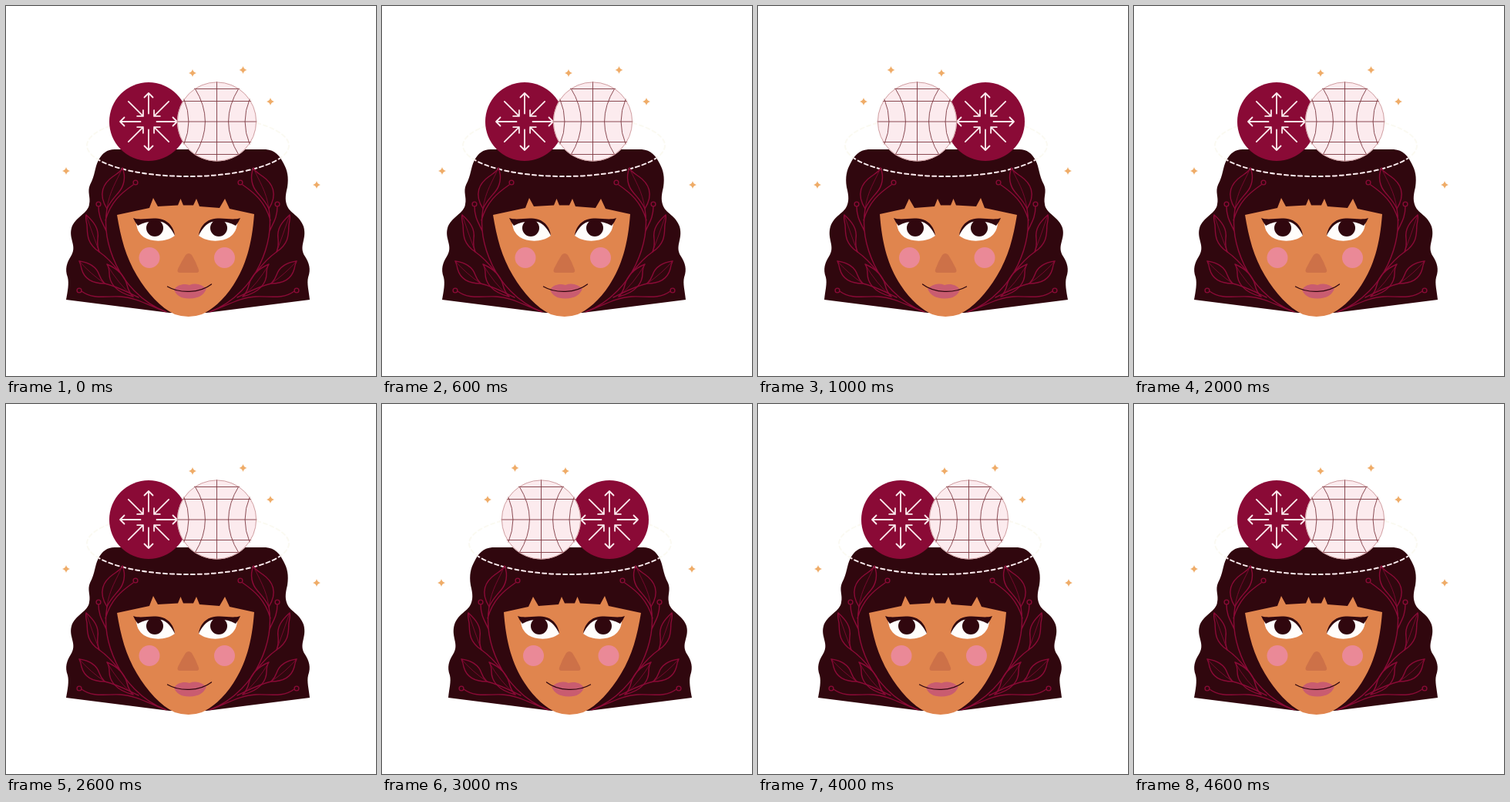
Write an HTML page with a canvas that moves like this. It is 480 px wide and 480 px high and loops after 5000 ms.

```html
<!DOCTYPE html>
<html lang="en">
<head>
<meta charset="utf-8">
<title>Head turning</title>
<style>
html, body { margin: 0; width: 100%; height: 100%; overflow: hidden; background: #fff; }
canvas { display: block; width: 100vw; height: 100vh; }
</style>
</head>
<body>
<canvas></canvas>
<script>
const SIZE = 480, LOOP = 5000, HOLD = 1000, AXIS = 236, TAU = Math.PI * 2;
const HAIR = '#30070e', SKIN = '#e0854e', WINE = '#8a0a36', PINK = '#fcebee', GRID = '#7d3942';
const canvas = document.querySelector('canvas');
const ctx = canvas.getContext('2d');

function fill(path, color) {
  ctx.fillStyle = color;
  ctx.fill(new Path2D(path));
}

function line(path, color, width) {
  ctx.strokeStyle = color;
  ctx.lineWidth = width;
  ctx.stroke(new Path2D(path));
}

function disc(x, y, r, color) {
  ctx.beginPath();
  ctx.arc(x, y, r, 0, TAU);
  ctx.fillStyle = color;
  ctx.fill();
}

function mirrored(axis, draw) {
  ctx.save();
  ctx.translate(axis * 2, 0);
  ctx.scale(-1, 1);
  draw();
  ctx.restore();
}

const hair = 'M78 381 C80 370 82 360 80 352 C76 341 79 333 84 325 C93 311 81 303 85 288 ' +
  'C89 274 107 269 108 257 C110 248 105 241 109 232 C116 219 115 209 120 200 ' +
  'C125 191 131 186 141 186 L337 186 C349 187 355 194 360 204 ' +
  'C365 213 367 222 365 235 C362 247 362 253 365 260 C369 269 381 272 386 286 ' +
  'C391 303 379 311 388 325 C393 333 396 341 392 352 C390 360 393 370 394 381 ' +
  'L260 398 L212 398 Z';

function halo(color) {
  ctx.beginPath();
  ctx.ellipse(236, 181, 131, 40, 0, 0, TAU);
  ctx.setLineDash([5, 4]);
  ctx.strokeStyle = color;
  ctx.lineWidth = 2;
  ctx.stroke();
  ctx.setLineDash([]);
}

function vine() {
  const leaves = 'M131 263 C119 244 126 230 139 221 C146 216 150 214 151 210 C156 222 153 234 146 242 C140 249 135 254 131 263 ' +
    'M121 319 C103 307 106 293 105 284 C104 278 103 275 104 271 C114 280 121 289 119 302 Q118 311 121 319 ' +
    'M128 360 C109 360 101 352 98 341 Q97 335 95 331 C110 333 118 340 121 349 Q123 355 128 360 ' +
    'M165 377 C141 371 134 358 134 347 Q134 340 131 335 C145 341 154 350 157 362 Q159 371 165 377';
  const veins = 'M151 210 C144 227 134 240 131 263 M104 271 Q112 295 121 319 M95 331 Q109 347 128 360 M131 335 Q145 360 165 377';
  const stems = 'M131 263 C127 287 132 313 143 336 C153 357 174 384 208 397 ' +
    'M165 232 C149 243 136 254 129 278 M120 260 C120 275 126 282 130 292 ' +
    'M121 319 Q134 328 147 345 M128 360 C145 364 157 371 172 378 ' +
    'M98 370 C113 381 130 376 148 377 C169 378 186 389 208 397';
  line(leaves, WINE, 1.4);
  line(veins, WINE, 0.8);
  line(stems, WINE, 1.4);
  for (const [x, y] of [[168, 229], [120, 257], [95, 369]]) {
    disc(x, y, 2.9, HAIR);
    ctx.strokeStyle = WINE;
    ctx.lineWidth = 1.4;
    ctx.stroke();
  }
}

function eye() {
  fill('M169 280 C177 276 193 275 203 278 C211 281 217 289 219 298 C207 307 189 306 179 300 C172 295 169 288 169 280 Z', '#fffdfb');
  disc(193, 288, 11, HAIR);
  fill('M165 275 C176 279 189 273 203 277 C212 280 218 288 219 298 C215 289 209 282 202 280 C190 278 180 280 171 285 Q167 280 165 275 Z', HAIR);
}

function face() {
  fill('M144 271 L186 262 L191 249 L197 260 L223 258.5 L226.5 250 L230 258.5 L243 258.5 L247 250 L251 260 ' +
    'L277 262 L284 250 L290 263 L322 270 C319 310 311 337 295 362 C282 382 266 395 254 400 ' +
    'Q237 406 219 400 C200 391 184 373 170 350 C155 325 149 301 144 271 Z', SKIN);
  eye();
  mirrored(234.5, eye);
  disc(186, 326.5, 13.5, '#ea8997');
  disc(283.5, 326.5, 13.5, '#ea8997');
  fill('M233 323 Q237 319 241 323 Q246 331 250 342 Q251 346 247 346 L226 346 Q221 346 223 341 Q228 331 233 323 Z', '#cd7148');
  fill('M218 368 C223 361 231 360 238 362 C246 359 254 361 260 367 C256 376 249 379 239 379.5 C228 380 221 376 218 368 Z', '#c95c70');
  line('M209.5 364 C225 373 251 373 266.5 361', HAIR, 1.3);
}

function arrow(angle, from, to) {
  const tip = to, back = to - Math.sign(to - from) * 5.5;
  ctx.save();
  ctx.rotate(angle);
  line(`M${from} 0 H${to} M${back} -5.5 L${tip} 0 L${back} 5.5`, PINK, 1.8);
  ctx.restore();
}

function arrows() {
  disc(185, 150, 51, WINE);
  ctx.save();
  ctx.translate(185, 150);
  for (let i = 0; i < 4; i++) {
    arrow(i * TAU / 4, 10.5, 37);
    arrow((i + 0.5) * TAU / 4, 37, 10);
  }
  ctx.restore();
}

function globe() {
  const r = 51.5;
  ctx.save();
  ctx.translate(273.5, 150);
  disc(0, 0, r, PINK);
  let d = `M0 ${-r} V${r}`;
  for (const y of [-42.5, -26.5, 0, 26.5, 42.5]) {
    const x = Math.sqrt(r * r - y * y);
    d += `M${-x} ${y} H${x}`;
  }
  for (const [inner, y] of [[15, 43], [36.5, 29]]) {
    const x = Math.sqrt(r * r - y * y);
    for (const s of [-1, 1]) d += `M${s * x} ${-y} Q${s * (2 * inner - x)} 0 ${s * x} ${y}`;
  }
  line(d, GRID, 0.9);
  ctx.beginPath();
  ctx.arc(0, 0, r - 0.4, 0, TAU);
  ctx.strokeStyle = '#c58d90';
  ctx.lineWidth = 0.8;
  ctx.stroke();
  ctx.restore();
}

function sparkle(x, y) {
  ctx.save();
  ctx.translate(x, y);
  fill('M0 -5 Q.9 -.9 5 0 Q.9 .9 0 5 Q-.9 .9 -5 0 Q-.9 -.9 0 -5 Z', '#efac68');
  ctx.restore();
}

function scene() {
  halo('#fbfaf2');
  fill(hair, HAIR);
  ctx.save();
  ctx.clip(new Path2D(hair));
  halo(PINK);
  vine();
  mirrored(AXIS, vine);
  ctx.restore();
  face();
  arrows();
  globe();
  for (const [x, y] of [[242, 87], [307.5, 83], [343, 124], [78, 214], [403, 232]]) sparkle(x, y);
}

function frame(now) {
  const dpr = window.devicePixelRatio || 1;
  const w = Math.round(innerWidth * dpr), h = Math.round(innerHeight * dpr);
  if (canvas.width !== w || canvas.height !== h) {
    canvas.width = w;
    canvas.height = h;
  }
  ctx.setTransform(w / SIZE, 0, 0, h / SIZE, 0, 0);
  ctx.fillStyle = '#fff';
  ctx.fillRect(0, 0, SIZE, SIZE);
  ctx.lineCap = ctx.lineJoin = 'round';
  const flipped = Math.floor((now % LOOP) / HOLD) % 2 === 1;
  if (flipped) mirrored(SIZE / 2, scene);
  else scene();
  requestAnimationFrame(frame);
}

requestAnimationFrame(frame);
</script>
</body>
</html>
```
